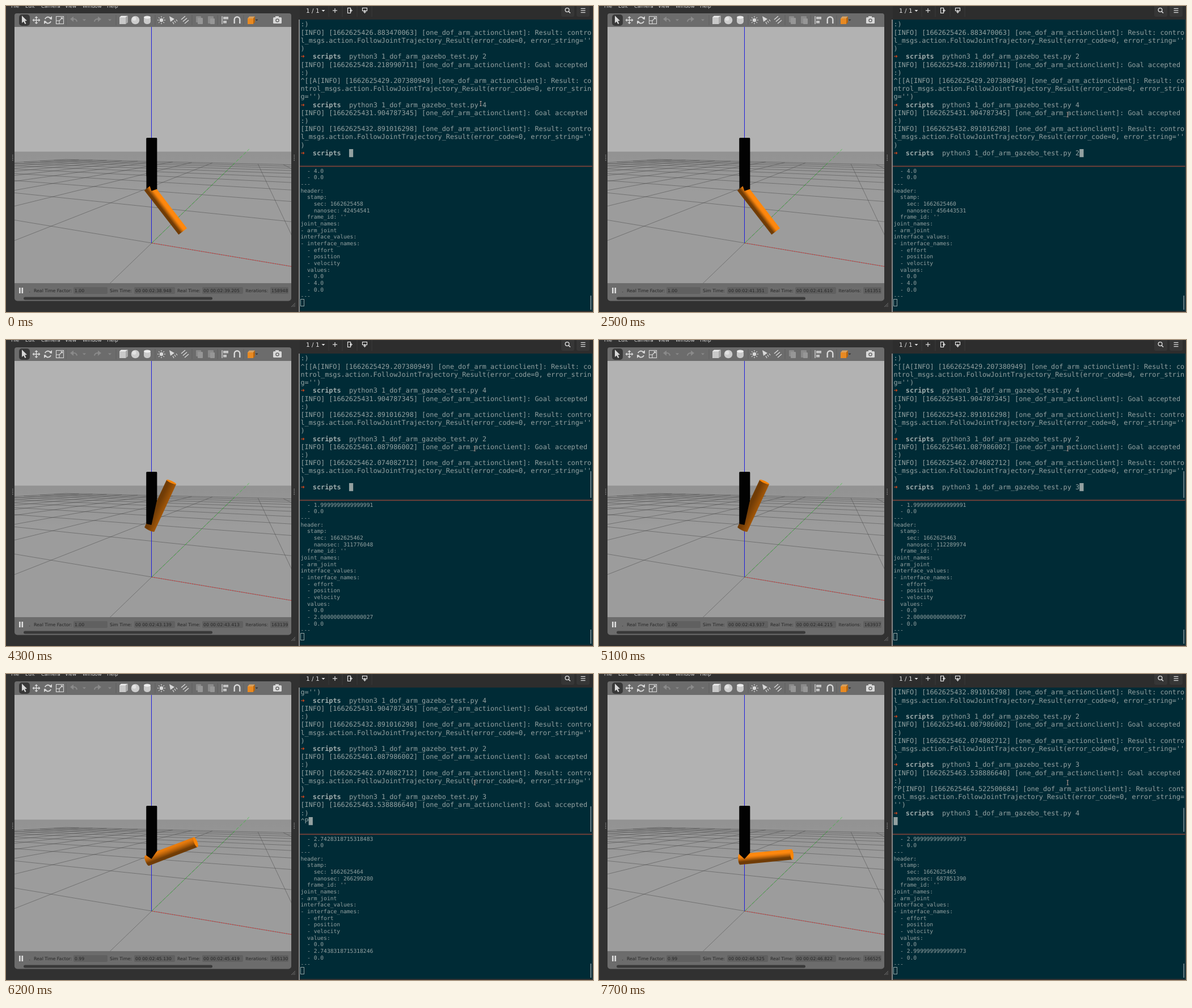
An HTML page with a canvas for the animation above (8 s loop, 1035 by 541 pixels).

```html
<!DOCTYPE html>
<html lang="en">
<head>
<meta charset="utf-8">
<title>One-joint arm simulation</title>
<style>
html, body { margin: 0; height: 100%; overflow: hidden; background: #313131; }
canvas { display: block; }
</style>
</head>
<body>
<canvas id="stage" width="1035" height="541"></canvas>
<script>
const ctx = document.getElementById('stage').getContext('2d');
const MONO = '"DejaVu Sans Mono", monospace', SANS = '"DejaVu Sans", sans-serif';
const LOOP = 8000, COLS = 72, ROWS = 17, PITCH = 7.128, TEXT_X = 519.4;

const refreshes = [0];
for (let t = 200; t <= 2500; t += 100) refreshes.push(t);
refreshes.push(3800, 3900, 4100, 4300, 4400, 4600, 4900, 5100, 5200, 5400, 5600,
  5900, 6000, 6200, 6400, 6500, 6800, 7000, 7200, 7300, 7500, 7700);

// time, simulator tick, simulated ms, real ms, message stamp in s
const clock = [
  [0, 0, 158948, 159205, 458.042454541],
  [1300, 6, 160147, 160407, 459.245538606],
  [2500, 12, 161351, 161610, 460.456443531],
  [3800, 19, 162740, 163012, 461.811454844],
  [5100, 25, 163937, 164215, 463.112289974],
  [6200, 31, 165130, 165419, 464.266299280],
  [7700, 38, 166525, 166822, 465.687851390],
];

// ---------- terminal session ----------
const PROMPT = '➜  scripts  ', RUN = 'python3 1_dof_arm_gazebo_test.py ';
const info = (stamp, text) => `[INFO] [1662625${stamp}] [one_dof_arm_actionclient]: ${text}\n`;
const accepted = stamp => info(stamp, 'Goal accepted :)');
const result = stamp => info(stamp,
  "Result: control_msgs.action.FollowJointTrajectory_Result(error_code=0, error_string='')");

const session = [
  [0, ':)\n' + result('426.883470063') + PROMPT + RUN + '2\n' + accepted('428.218990711') +
    '^[[A' + result('429.207380949') + PROMPT + RUN + '4\n' + accepted('431.904787345') +
    result('432.891016298') + PROMPT],
  [1700, RUN + '4'], [2100, '\b'], [2400, '2'],
  [3800, '\n' + accepted('461.087986002')],
  [4100, result('462.074082712') + PROMPT],
  [4600, RUN + '2'], [5100, '\b3'], [5200, '\n'],
  [5600, accepted('463.538886640')], [6200, '^P'],
  [6500, result('464.522500684') + PROMPT],
  [6800, RUN], [7200, '4'], [7500, '\n'],
];

function sessionLines(t) {
  let text = '';
  for (const [time, out] of session) {
    if (time > t) break;
    for (const c of out) text = c === '\b' ? text.slice(0, -1) : text + c;
  }
  return text.split('\n').flatMap(line => line.match(new RegExp(`.{1,${COLS}}`, 'g')) || ['']);
}

// ---------- state ----------
const clamp = (v, lo, hi) => Math.min(hi, Math.max(lo, v));
const lerp = (a, b, f) => a + (b - a) * f;

function clockAt(t) {
  const i = clock.findLastIndex(row => row[0] <= t);
  const a = clock[i], b = clock[i + 1] || a;
  const f = b === a ? 0 : (t - a[0]) / (b[0] - a[0]);
  const ticks = b[1] - a[1];
  const step = ticks ? Math.floor(f * ticks + 1e-6) / ticks : 0;
  return { sim: Math.round(lerp(a[2], b[2], step)), real: Math.round(lerp(a[3], b[3], step)), stamp: lerp(a[4], b[4], f) };
}

const jointAt = stamp => stamp < 463
  ? 4 - 2 * clamp(stamp - 461.072837838515952, 0, 1)
  : 2 + clamp(stamp - 463.522467408468174, 0, 1);

function jointText(stamp, latest) {
  const p = jointAt(stamp);
  if (p === 4) return '4.0';
  if (p === 3) return '2.9999999999999973';
  if (p === 2) return latest ? '2.0000000000000027' : '1.9999999999999991';
  return String(p);
}

function timeText(ms) {
  const pad = (n, w = 2) => String(n).padStart(w, '0');
  return `00 00:${pad(Math.floor(ms / 60000))}:${pad(Math.floor(ms / 1000) % 60)}.${pad(ms % 1000, 3)}`;
}

// ---------- drawing helpers ----------
function rect(x, y, w, h, color, radius = 0) {
  ctx.fillStyle = color;
  ctx.beginPath();
  ctx.roundRect(x, y, w, h, radius);
  ctx.fill();
}
function path(points, close) {
  ctx.beginPath();
  points.forEach(p => ctx.lineTo(p[0], p[1]));
  if (close) ctx.closePath();
}
function line(color, width, ...points) {
  ctx.strokeStyle = color;
  ctx.lineWidth = width;
  path(points);
  ctx.stroke();
}
function poly(color, ...points) {
  ctx.fillStyle = color;
  path(points, true);
  ctx.fill();
}
function ellipse(x, y, rx, ry, color, angle = 0) {
  ctx.fillStyle = color;
  ctx.beginPath();
  ctx.ellipse(x, y, rx, ry, angle, 0, 7);
  ctx.fill();
}
const disc = (x, y, r, color) => ellipse(x, y, r, r, color);
function arc(x, y, r, from, to, color, width = 1.5) {
  ctx.strokeStyle = color;
  ctx.lineWidth = width;
  ctx.beginPath();
  ctx.arc(x, y, r, from, to);
  ctx.stroke();
}
function label(text, x, y, color, font) {
  ctx.font = font;
  ctx.textRendering = 'geometricPrecision';
  ctx.fillStyle = color;
  ctx.fillText(text, x, y);
}
const caret = (x, y, color, s = 3) => poly(color, [x - s, y - s / 2], [x + s, y - s / 2], [x, y + s / 2]);

// ---------- simulator scene ----------
const YAW = 0.395, DEPTH = 1.785, FOCAL = 417;
const ground = (x, y) => ({
  side: x * Math.cos(YAW) + y * Math.sin(YAW),
  depth: DEPTH + y * Math.cos(YAW) - x * Math.sin(YAW),
});
const project = p => [257 + FOCAL * p.side / p.depth, 251 + 300 / p.depth];

function groundLine(color, width, a, b) {
  const near = 0.3;
  if (a.depth < near && b.depth < near) return;
  const cut = (p, q) => p.depth >= near ? p
    : { side: lerp(p.side, q.side, (near - p.depth) / (q.depth - p.depth)), depth: near };
  line(color, width, project(cut(a, b)), project(cut(b, a)));
}

function drawArm(joint) {
  const J = [256.5, 327], theta = joint - Math.PI / 2;
  const tip = [J[0] + 84.5 * Math.sin(theta), J[1] + 4.6 - 88.6 * Math.cos(theta)];
  const a = Math.atan2(tip[0] - J[0], J[1] - tip[1]);
  const dir = [Math.sin(a), -Math.cos(a)], up = [dir[1], -dir[0]];
  const base = [J[0] - 8.5 * dir[0], J[1] - 8.5 * dir[1]];
  const at = (p, side) => [p[0] + side * up[0], p[1] + side * up[1]];
  const upperLink = () => rect(247.5, 233, 18.7, 94, '#020202', 1.5);

  upperLink();
  const lit = clamp(1.4 * Math.cos(a - Math.PI * 0.75), -0.2, 1);
  const shade = ctx.createLinearGradient(...at(J, -9.5), ...at(J, 9.5));
  for (let i = 0; i <= 8; i++) {
    const u = i / 4 - 1;
    const b = clamp(0.5 + 0.7 * lit * u + 0.3 * Math.max(0, lit) * Math.sqrt(1 - u * u), 0.44, 1);
    shade.addColorStop(i / 8, `rgb(${255 * b},${136 * b},${14 * b})`);
  }
  const capDepth = 3 * clamp(Math.sin(1.25 * a + 0.15), 0, 1);
  ellipse(...base, capDepth, 9.5, shade, a - Math.PI / 2);
  poly(shade, at(base, -9.5), at(base, 9.5), at(tip, 9.3), at(tip, -9.3));
  ellipse(...tip, capDepth, 9.3, '#f98507', a - Math.PI / 2);

  // The upper link stays in front between the bisectors of the two axes
  const ray = angle => [J[0] + 200 * Math.sin(angle), J[1] - 200 * Math.cos(angle)];
  ctx.save();
  path([J, ray(a / 2), ray(0), ray(a / 2 - Math.PI / 2)], true);
  ctx.clip();
  upperLink();
  ctx.restore();
}

function drawScene(joint) {
  ctx.save();
  ctx.beginPath();
  ctx.rect(15, 37, 488, 453);
  ctx.clip();
  rect(15, 37, 488, 221, '#b2b2b2');
  const floor = ctx.createLinearGradient(0, 258, 0, 330);
  floor.addColorStop(0, '#929292');
  floor.addColorStop(1, '#9c9c9c');
  rect(15, 257.5, 488, 233, floor);
  for (let i = -10; i <= 10; i++) {
    groundLine('rgba(70,70,70,.7)', 0.7, ground(i, -10), ground(i, 10));
    groundLine('rgba(70,70,70,.7)', 0.7, ground(-10, i), ground(10, i));
  }
  ctx.setLineDash([2, 2]);
  groundLine('rgba(245,30,30,.9)', 1, ground(0, 0), ground(3, 0));
  ctx.setLineDash([6, 3]);
  groundLine('rgba(30,200,30,.8)', 0.8, ground(0, 0), ground(0, 150));
  ctx.setLineDash([]);
  line('#1c1cdc', 1, [256.5, 37], [256.5, 419]);
  drawArm(joint);
  ctx.restore();
}

// ---------- simulator window ----------
const BAR = '#6c6c6c';

function drawToolbar() {
  const ink = '#d8d8d8', dim = '#8a8a8a', y = 25;
  rect(15, 13, 488, 25, BAR, [4, 4, 0, 0]);
  for (const x of [106, 194, 263, 328, 373, 419]) line('#606060', 1, [x, 16], [x, 34]);

  rect(23, 15, 19, 20, '#383838', 5);
  poly(ink, [28, 17], [28, 30], [31, 27.5], [33.5, 32], [35.5, 31], [33.2, 26.5], [37, 26]);

  line(ink, 1.6, [48, y], [59, y]);
  line(ink, 1.6, [53.5, 19.5], [53.5, 30.5]);
  for (const [dx, dy] of [[1, 0], [-1, 0], [0, 1], [0, -1]])
    poly(ink, [53.5 + 7 * dx, y + 7 * dy], [53.5 + 4 * dx + 3 * dy, y + 4 * dy + 3 * dx], [53.5 + 4 * dx - 3 * dy, y + 4 * dy - 3 * dx]);

  arc(74, y, 5.5, 0.4, 2.9, ink, 1.8);
  arc(74, y, 5.5, 3.5, 6, ink, 1.8);
  poly(ink, [76, 22], [81, 18], [81, 24]);
  poly(ink, [72, 28], [67, 32], [67, 26]);

  ctx.strokeStyle = ink;
  ctx.lineWidth = 1.1;
  ctx.strokeRect(88.5, 18.5, 13, 13);
  ctx.strokeRect(88.5, 26, 5.5, 5.5);
  line(ink, 1.2, [94, 26], [99, 21]);
  poly(ink, [100, 20], [100, 24], [96, 20]);

  for (const [x, s] of [[120, 1], [161, -1]]) {
    arc(x, 28, 5, s > 0 ? 4.2 : 3.2, s > 0 ? 6.2 : 5.2, dim, 2);
    poly(dim, [x - 7 * s, 23], [x - s, 18.5], [x - s, 28]);
    caret(x + (s > 0 ? 18 : 22), 25, dim);
  }

  rect(200, 20, 11, 12, '#c9c9c9');
  poly('#f2f2f2', [200, 20], [203, 17.5], [215, 17.5], [211, 20]);
  poly('#a8a8a8', [211, 20], [215, 17.5], [215, 29], [211, 32]);
  disc(228, y, 7.3, '#cdcdcd');
  disc(226, 22.5, 3.5, '#e2e2e2');
  rect(243, 18, 12, 14, '#cacaca', 5);
  ellipse(249, 20, 6, 2.6, '#ededed');

  disc(274, y, 3.2, ink);
  for (let i = 0; i < 8; i++) {
    const c = Math.cos(i * Math.PI / 4), s = Math.sin(i * Math.PI / 4);
    line(ink, 1.2, [274 + 4.7 * c, y + 4.7 * s], [274 + 7 * c, y + 7 * s]);
  }
  poly(ink, [288, 18], [297, 23], [290, 28]);
  for (let i = 0; i < 3; i++) {
    line(ink, 1.2, [294 + i * 3, 28 - i * 2], [296 + i * 3, 32 - i * 2.5]);
    line(ink, 1.5, [309 + i * 3, 24 + i * 3.5], [316 + i * 3, 18 + i * 3.5]);
  }

  rect(335, 18, 9, 11, dim, 1);
  rect(338, 21, 9, 11, '#969696', 1);
  rect(356, 18, 10, 13, dim, 1);
  rect(360, 22, 8, 10, '#969696', 1);

  line(ink, 1.3, [381, 18], [381, 32]);
  rect(383, 19, 9, 4.5, '#c4c4c4');
  rect(383, 26, 6, 4.5, '#c4c4c4');
  arc(407.5, 24, 4.8, Math.PI, 2 * Math.PI, ink, 2.4);
  line(ink, 2.4, [402.7, 24], [402.7, 31]);
  line(ink, 2.4, [412.3, 24], [412.3, 31]);

  rect(426, 22, 10, 10, '#e88a22');
  poly('#d9a05c', [426, 22], [429, 18.5], [439, 18.5], [436, 22]);
  poly('#b8660f', [436, 22], [439, 18.5], [439, 28.5], [436, 32]);
  caret(442, 25, '#303030', 2.5);

  rect(471, 20, 15, 11, ink, 1.5);
  rect(475, 18, 6, 3, ink);
  disc(478.5, 25.5, 3.3, BAR);
  disc(478.5, 25.5, 1.8, ink);
}

function drawStatus(t, sim, real) {
  rect(15, 490, 488, 31.5, BAR, [0, 0, 5, 5]);
  rect(23, 498, 2.6, 10, '#dedede');
  rect(27.5, 498, 2.6, 10, '#dedede');
  rect(41, 505, 1.2, 1.2, '#444');
  const fields = [
    ['Real Time Factor:', 49, 119, 60, t < 5900 ? '1.00' : '0.99'],
    ['Sim Time:', 183, 226, 72, timeText(sim)],
    ['Real Time:', 302, 346, 72, timeText(real)],
    ['Iterations:', 422.5, 466, 32, String(sim)],
  ];
  for (const [name, x, boxX, width, value] of fields) {
    label(name, x, 506, '#262626', `7.8px ${SANS}`);
    rect(boxX, 497, width, 12, '#606060', 2);
    label(value, boxX + 2, 506, '#262626', `7.7px ${SANS}`);
  }
  rect(31, 514.5, 333, 5, '#393939', 2.5);
}

function drawSimulator(t, now) {
  const menus = [['File', 9], ['Edit', 34], ['Camera', 62], ['View', 104], ['Window', 135], ['Help', 178]];
  for (const [name, x] of menus) label(name, x, 2.6, '#d6d6d6', `8.6px ${SANS}`);
  drawToolbar();
  drawScene(jointAt(now.stamp));
  drawStatus(t, now.sim, now.real);
  for (let i = 0; i < 4; i++) {
    rect(11, 263 + i * 3, 1.5, 1.5, '#858585');
    rect(507.5, 263 + i * 3, 1.5, 1.5, '#858585');
  }
  for (let i = 0; i < 3; i++) line('#777', 0.9, [503 + i * 2.6, 532], [510, 525 + i * 2.6]);
}

// ---------- terminal window ----------
function drawTitleBar() {
  const ink = '#e4e4e4';
  rect(518, 0, 517, 24, '#2d2d2d');
  label('1 / 1', 529, 12, ink, `10.5px ${SANS}`);
  caret(559.5, 8.5, ink);
  for (const x of [569, 593, 619, 645]) line('#3b3b3b', 1, [x, 0], [x, 19]);
  line(ink, 1.2, [576, 8], [584, 8]);
  line(ink, 1.2, [580, 4], [580, 12]);
  ctx.strokeStyle = ink;
  ctx.lineWidth = 1.2;
  ctx.strokeRect(602.5, 3.5, 5, 9);
  line(ink, 1.2, [606, 8], [611, 8]);
  line(ink, 1.2, [608.5, 5.5], [608.5, 10.5]);
  ctx.strokeRect(628.5, 3.5, 8, 5);
  line(ink, 1.2, [632.5, 7], [632.5, 13]);
  line(ink, 1.2, [630, 10.5], [635, 10.5]);
  rect(979, -4, 23, 23, '#363636', 3);
  rect(1006, -4, 23, 23, '#363636', 3);
  arc(989.5, 7, 3.4, 0, 7, ink, 1.3);
  line(ink, 1.5, [992, 9.5], [995, 12.5]);
  for (const y of [4.5, 8, 11.5]) line(ink, 1.2, [1013.5, y], [1021.5, y]);
}

function drawSession(t) {
  const lines = sessionLines(t), visible = lines.slice(-ROWS), ink = '#93a1a1';
  const font = `11.84px ${MONO}`, bold = `bold 11.84px ${MONO}`;
  visible.forEach((text, row) => {
    const y = 36.4 + row * 14.22;
    if (text.startsWith('➜')) {
      label('➜', TEXT_X, y, '#d9481c', bold);
      label('scripts', TEXT_X + 3 * PITCH, y, '#9eacac', bold);
      label(text.slice(PROMPT.length), TEXT_X + PROMPT.length * PITCH, y, ink, font);
    } else label(text, TEXT_X, y, ink, font);
  });
  rect(TEXT_X + visible.at(-1).length * PITCH, 253, 7.2, 14.2, ink);
  if (t >= 200 && t < 2300 || t >= 3800) {
    const top = 228 + 0.68 * (lines.length - ROWS);
    rect(1030.5, top, 1.5, 279 - top, '#83949a');
  }
}

function drawMessages(stamp) {
  const sec = Math.floor(stamp), nano = Math.round((stamp - sec) * 1e9);
  const rows = [
    `  - ${jointText(stamp - 0.001, false)}`, '  - 0.0', '---', 'header:', '  stamp:',
    `    sec: ${1662625000 + sec}`, `    nanosec: ${nano}`, "  frame_id: ''",
    'joint_names:', '- arm_joint', 'interface_values:', '- interface_names:',
    '  - effort', '  - position', '  - velocity', '  values:',
    '  - 0.0', `  - ${jointText(stamp, true)}`, '  - 0.0', '---',
  ];
  rows.forEach((text, i) => label(text, TEXT_X, 294.7 + i * 11.66, '#93a1a1', `9.67px ${MONO}`));
  ctx.strokeStyle = '#93a1a1';
  ctx.lineWidth = 1;
  ctx.strokeRect(519.5, 518.5, 6, 12);
  rect(1030.5, 512, 1.5, 25, '#83949a');
}

function drawPointer(t) {
  const f = clamp((t - 100) / 900, 0, 1), ease = f * f * (3 - 2 * f);
  const x = lerp(837, 826.3, ease), y = lerp(172.5, 192, ease);
  for (const [color, width] of [['#111', 2], ['#d0d0d0', 0.9]]) {
    line(color, width, [x, y - 3.5], [x, y + 3.5]);
    for (const dy of [-4, 4]) line(color, width, [x - 1.6, y + dy], [x + 1.6, y + dy]);
  }
}

function drawTerminal(t, stamp) {
  rect(516, 24, 2, 517, '#858585');
  rect(518, 24, 517, 515, '#002b36');
  drawTitleBar();
  drawSession(t);
  rect(518, 282.4, 516, 1.8, '#7d4238');
  drawMessages(stamp);
  drawPointer(t);
  rect(1033.5, 24, 1.5, 517, '#2d3a3e');
}

// ---------- loop ----------
let shown = -1;
function frame() {
  const now = performance.now() % LOOP;
  const t = refreshes.findLast(r => r <= now);
  if (t !== shown) {
    shown = t;
    const state = clockAt(t);
    rect(0, 0, 1035, 541, '#313131');
    drawSimulator(t, state);
    drawTerminal(t, state.stamp);
  }
  requestAnimationFrame(frame);
}
frame();
</script>
</body>
</html>
```
